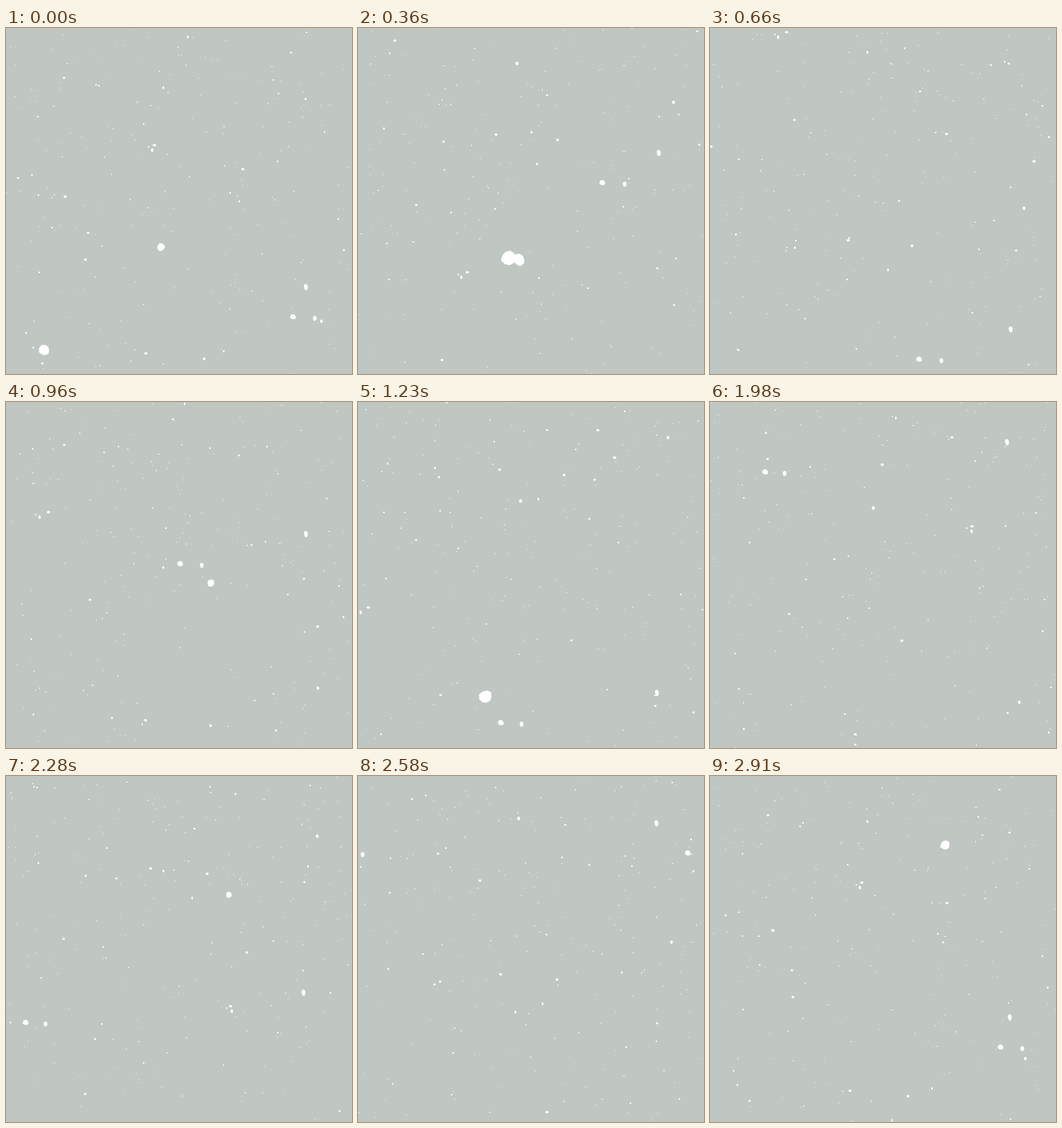
Animation of 480 by 480 pixels, one loop 2.94 s. Source, as an HTML page with a canvas:

```html
<!DOCTYPE html>
<html lang="en">
<head>
<meta charset="utf-8">
<title>Snowfall</title>
<style>
  html, body { margin: 0; width: 100%; height: 100%; overflow: hidden; background: #c0c6c2; }
  canvas { display: block; }
</style>
</head>
<body>
<canvas id="stage" width="480" height="480"></canvas>
<script>
const SIZE = 480, LOOP = 2940, STEP = 30, TAU = Math.PI * 2;
const ctx = document.getElementById('stage').getContext('2d');

let seed = 71;
const rand = () => {
  seed = (seed * 1664525 + 1013904223) % 4294967296;
  return seed / 4294967296;
};
const wrap = v => ((v % SIZE) + SIZE) % SIZE;
const outline = () => Array.from({ length: 9 }, () => 0.87 + rand() * 0.26);

// Close flakes rush past the camera
const closeFlake = (at, x, y, r) => ({ at, x, y, r, edge: outline() });
const near = [
  closeFlake(0, 53, 447, 7.3),
  closeFlake(0, 215, 304, 5.5),
  closeFlake(360, 209, 319, 10),
  closeFlake(360, 223, 321, 8.5),
  closeFlake(960, 284, 251, 5),
  closeFlake(1230, 177, 409, 9),
  closeFlake(1680, 254, 91, 8.3),
  closeFlake(2280, 309, 165, 4.2),
  closeFlake(2910, 326, 96, 6.5)
];

// Far flakes: mostly specks, rarely larger; they thin out towards the ground
const far = Array.from({ length: 275 }, () => {
  const r = Math.min(4, 0.5 * Math.pow(rand(), -0.4));
  const stretch = 0.75 + rand() * 0.5;
  return {
    r, stretch,
    x: rand() * SIZE, y: rand() * SIZE,
    falls: Math.round(1 + r + rand()),
    drift: -Math.floor(rand() * 2),
    sway: rand() * 8, phase: rand() * TAU,
    end: 120 + rand() * 700,
    edge: outline()
  };
});

function blob(x, y, { r, edge, stretch = 1 }) {
  ctx.beginPath();
  edge.forEach((k, i) => {
    const a = i / edge.length * TAU;
    ctx.lineTo(x + Math.cos(a) * r * k * stretch, y + Math.sin(a) * r * k / stretch);
  });
  ctx.fill();
}

function speck(x, y, { r, stretch }) {
  const side = k => Math.max(1, Math.round(r * 1.7 * k));
  ctx.fillRect(Math.floor(x), Math.floor(y), side(stretch), side(1 / stretch));
}

function draw(t) {
  ctx.fillStyle = '#c0c6c2';
  ctx.fillRect(0, 0, SIZE, SIZE);
  ctx.fillStyle = '#fff';
  const p = t / LOOP;
  for (const f of far) {
    const y = wrap(f.y + f.falls * SIZE * p);
    if (y > f.end) continue;
    const x = wrap(f.x + f.drift * SIZE * p + f.sway * Math.sin(TAU * p + f.phase));
    (f.r < 1.4 ? speck : blob)(x, y, f);
  }
  for (const f of near) {
    const dt = t - f.at;
    blob(f.x - 0.3 * dt, f.y + 1.6 * dt, f);
  }
}

const start = performance.now();
function tick() {
  const t = (performance.now() - start) % LOOP;
  draw(Math.floor(t / STEP) * STEP);
  requestAnimationFrame(tick);
}
tick();
</script>
</body>
</html>
```
